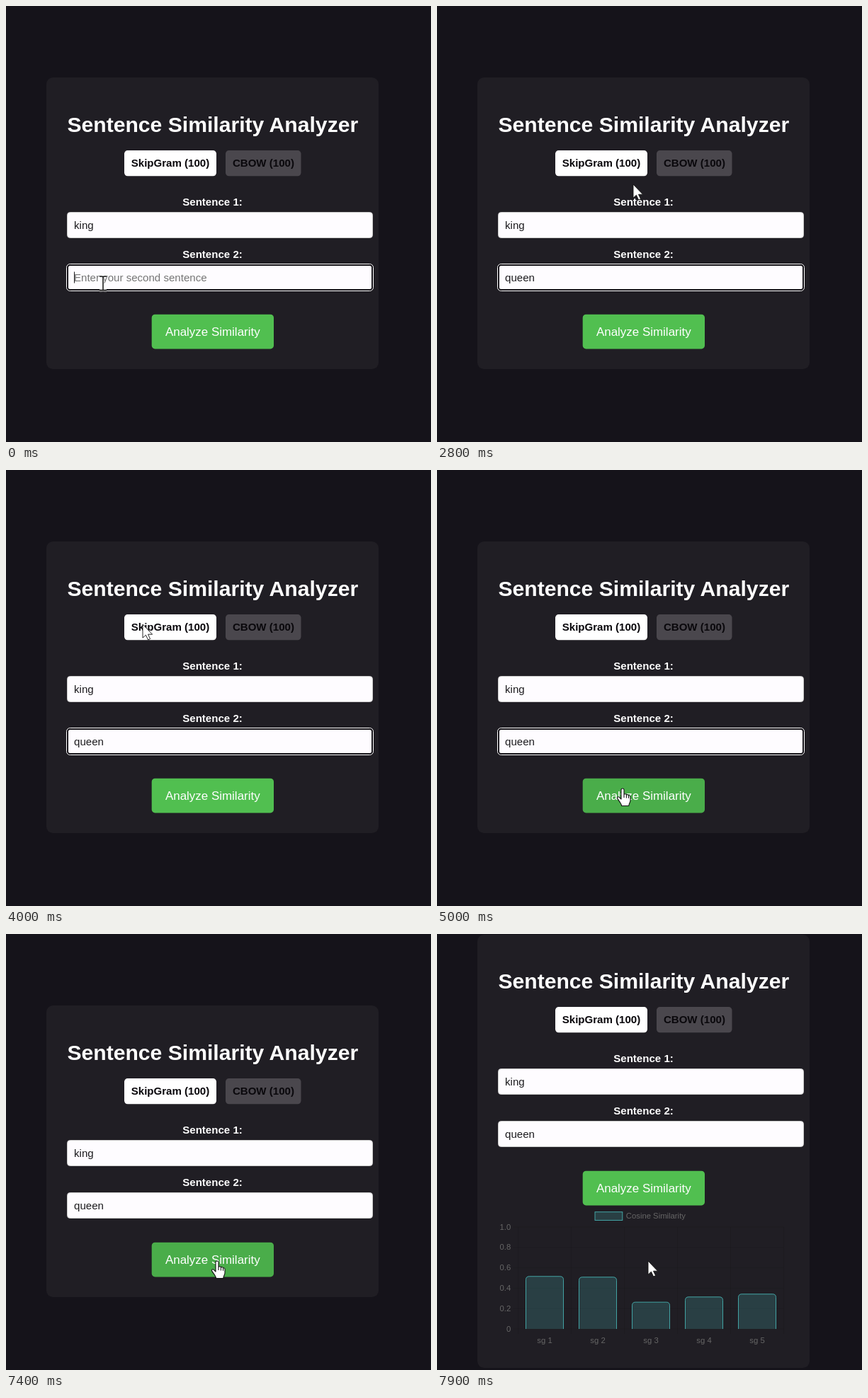
These frames come from a looping animation (600 px wide and 616 px high, 8 s). An HTML page:

```html
<!DOCTYPE html>
<html lang="en">
<head>
<meta charset="utf-8">
<title>Sentence Similarity Analyzer</title>
<style>
  html, body { margin: 0; width: 100%; height: 100%; overflow: hidden; background: #15131a; }
  svg { display: block; width: 600px; height: 616px; }
  text { font-family: "Liberation Sans", Arial, sans-serif; font-size: 15.07px; white-space: pre; }
  .bold { font-weight: bold; }
  .mid { text-anchor: middle; }
  .chart text { font-size: 11.3px; fill: #666; }
  .grid { stroke: #000; stroke-opacity: .1; stroke-width: .94; }
  .teal { fill: #4bc0c0; fill-opacity: .2; stroke: #4bc0c0; stroke-opacity: .85; stroke-width: .94; }
  .input { fill: #fefcff; stroke: #ccc; }
</style>
</head>
<body>
<svg viewBox="0 0 600 616">
  <rect width="600" height="616" fill="#15131a"/>
  <rect id="card" x="57" y="101" width="469" height="412" rx="9.5" fill="#201e24"/>

  <g id="form">
    <text class="bold mid" x="291.8" y="178" fill="#fff" style="font-size:30.14px">Sentence Similarity Analyzer</text>
    <rect x="167" y="204" width="130" height="36.3" rx="4.7" fill="#fff"/>
    <text class="bold mid" x="232" y="227" fill="#0a080c">SkipGram (100)</text>
    <rect x="310" y="204" width="106.5" height="36.3" rx="4.7" fill="#4a474d"/>
    <text class="bold mid" x="363.4" y="227" fill="#0a080c">CBOW (100)</text>

    <text class="bold mid" x="291.5" y="282" fill="#fff">Sentence 1:</text>
    <rect class="input" x="86.5" y="291.5" width="431" height="36" rx="4"/>
    <text x="96" y="315" fill="#1c1b1e">king</text>

    <text class="bold mid" x="291.5" y="356" fill="#fff">Sentence 2:</text>
    <rect class="input" x="86.5" y="365.5" width="431" height="36" rx="4"/>
    <g id="focus" fill="none">
      <rect x="85.5" y="364.5" width="433" height="38" rx="5" stroke="#fff"/>
      <rect x="87" y="366" width="430" height="35" rx="3.5" stroke="#131116" stroke-width="2"/>
    </g>
    <text id="entry" x="96" y="389"></text>
    <rect id="caret" y="375.5" width="1" height="16" fill="#1c1b1e"/>

    <rect id="button" x="205.7" y="435.7" width="172.3" height="48.8" rx="4.7"/>
    <text class="mid" x="291.8" y="466" fill="#fff" style="font-size:16.96px">Analyze Similarity</text>
  </g>

  <g id="chart" class="chart">
    <rect class="teal" x="223" y="392.7" width="38.8" height="11.8"/>
    <text x="266.8" y="402">Cosine Similarity</text>
  </g>

  <path id="arrow" d="M0 0V19.2L4.4 15.2L7.6 22L10.6 20.6L7.5 14.2H13.6Z" fill="#fff" stroke="#111" stroke-width=".9"/>
  <path id="hand" d="M-2 1.8C-2-.6 2-.6 2 1.8V8.4C3.3 7.2 5.2 7.8 5.4 9C6.6 8.1 8.3 8.8 8.5 10C9.8 9.4 11 10.3 11 11.8V17C11 19.5 9 21 8.7 24.5H-1.4C-1.6 21.2-4.6 18.4-7.2 14.4C-8.4 12.2-6 10.9-4.4 12.6L-2 15Z M2 8.4V13 M5.4 9V13.4 M8.5 10V13.8" fill="#fff" stroke="#111" stroke-width="1.1" stroke-linejoin="round"/>
  <g id="beam" fill="none">
    <path d="M-5-10H-2Q0-10 0-8.5Q0-10 2-10H5M0-8.5V8.5M-5 10H-2Q0 10 0 8.5Q0 10 2 10H5" stroke="#fff" stroke-width="3"/>
    <path d="M-5-10H-2Q0-10 0-8.5Q0-10 2-10H5M0-8.5V8.5M-5 10H-2Q0 10 0 8.5Q0 10 2 10H5" stroke="#111" stroke-width="1.5"/>
  </g>
</svg>
<script>
const LOOP = 8000, BLUR = 6200, RESULT = 7680, SHIFT = -101;
const WORD = "queen", KEY_TIMES = [500, 700, 900, 1050, 1250];
const POINTER_BACK = 1650, BLINK = 950;
const SCORES = [.514, .507, .262, .313, .341], SHOWN_AT = .22;
const BASE = 558, PLOT = 144, LEFT = 114.5, STEP = 75;

// time, x, y of the pointer tip
const PATH = [
  [1650, 137, 392], [2250, 225, 320], [2800, 277, 252], [3350, 228, 226],
  [4000, 193, 218], [4250, 197, 226], [4750, 250, 466], [5000, 262, 450],
  [5450, 284, 469], [5900, 298, 462]
];

const $ = id => document.getElementById(id);
const show = (id, on) => $(id).setAttribute("display", on ? "inline" : "none");
const easeOutQuart = p => 1 - (1 - p) ** 4;

function add(tag, attrs, text = "") {
  const node = document.createElementNS("http://www.w3.org/2000/svg", tag);
  for (const key in attrs) node.setAttribute(key, attrs[key]);
  node.textContent = text;
  return $("chart").appendChild(node);
}

for (let i = 0; i <= 5; i++) {
  const y = BASE - PLOT * i / 5, x = LEFT + STEP * i;
  add("path", { class: "grid", d: `M107 ${y}H${LEFT + STEP * 5}M${x} ${BASE - PLOT}V${BASE + 7}` });
  add("text", { x: 104.3, y: y + 3.5, "text-anchor": "end" }, i ? (i / 5).toFixed(1) : "0");
}
const bars = SCORES.map((_, i) => {
  add("text", { class: "mid", x: LEFT + STEP * (i + .5), y: 578 }, `sg ${i + 1}`);
  return add("path", { class: "teal" });
});

function barPath(i, height) {
  const x = LEFT + STEP * i + 11, w = 53, r = Math.min(4.7, height), top = BASE - height;
  return `M${x} ${BASE}V${top + r}q0 ${-r} ${r} ${-r}H${x + w - r}q${r} 0 ${r} ${r}V${BASE}`;
}

function pointerAt(t) {
  if (t <= PATH[0][0]) return PATH[0].slice(1);
  const next = PATH.findIndex(p => p[0] > t);
  if (next < 0) return PATH[PATH.length - 1].slice(1);
  const [t0, x0, y0] = PATH[next - 1], [t1, x1, y1] = PATH[next];
  const p = (t - t0) / (t1 - t0), e = p * p * (3 - 2 * p);
  return [x0 + (x1 - x0) * e, y0 + (y1 - y0) * e];
}

const inside = (x, y, x0, y0, x1, y1) => x > x0 && x < x1 && y > y0 && y < y1;

function render(t) {
  const done = t >= RESULT, focused = t < BLUR;
  const typed = KEY_TIMES.filter(k => k <= t).length;
  const lastKey = KEY_TIMES[KEY_TIMES.length - 1];

  $("card").setAttribute("y", done ? 1 : 101);
  $("card").setAttribute("height", done ? 612 : 412);
  $("form").setAttribute("transform", `translate(0 ${done ? SHIFT : 0})`);

  const entry = $("entry");
  entry.textContent = typed ? WORD.slice(0, typed) : "Enter your second sentence";
  entry.setAttribute("fill", typed ? "#1c1b1e" : "#757575");
  const width = typed ? entry.getComputedTextLength() : 0;
  $("caret").setAttribute("x", Math.round(96 + width));
  show("caret", focused && (t < lastKey || (t - lastKey) % BLINK < BLINK / 2));
  show("focus", focused);

  const [x, y] = pointerAt(t);
  const overButton = !done && inside(x, y, 206, 436, 378, 484);
  const overInput = !done && (inside(x, y, 86, 291, 518, 328) || inside(x, y, 86, 365, 518, 402));
  const visible = t < KEY_TIMES[0] || t >= POINTER_BACK;
  const kind = overButton ? "hand" : overInput ? "beam" : "arrow";
  for (const id of ["arrow", "hand", "beam"]) {
    show(id, visible && id === kind);
    $(id).setAttribute("transform", `translate(${x} ${y})`);
  }
  $("button").setAttribute("fill", overButton ? "#4aad4a" : "#51bf50");

  show("chart", done);
  const grown = easeOutQuart(Math.max(0, (t - RESULT) / 1000)) / easeOutQuart(SHOWN_AT);
  bars.forEach((bar, i) => bar.setAttribute("d", barPath(i, PLOT * SCORES[i] * grown)));
}

const start = performance.now();
function tick() {
  render((performance.now() - start) % LOOP);
  requestAnimationFrame(tick);
}
tick();
</script>
</body>
</html>
```
